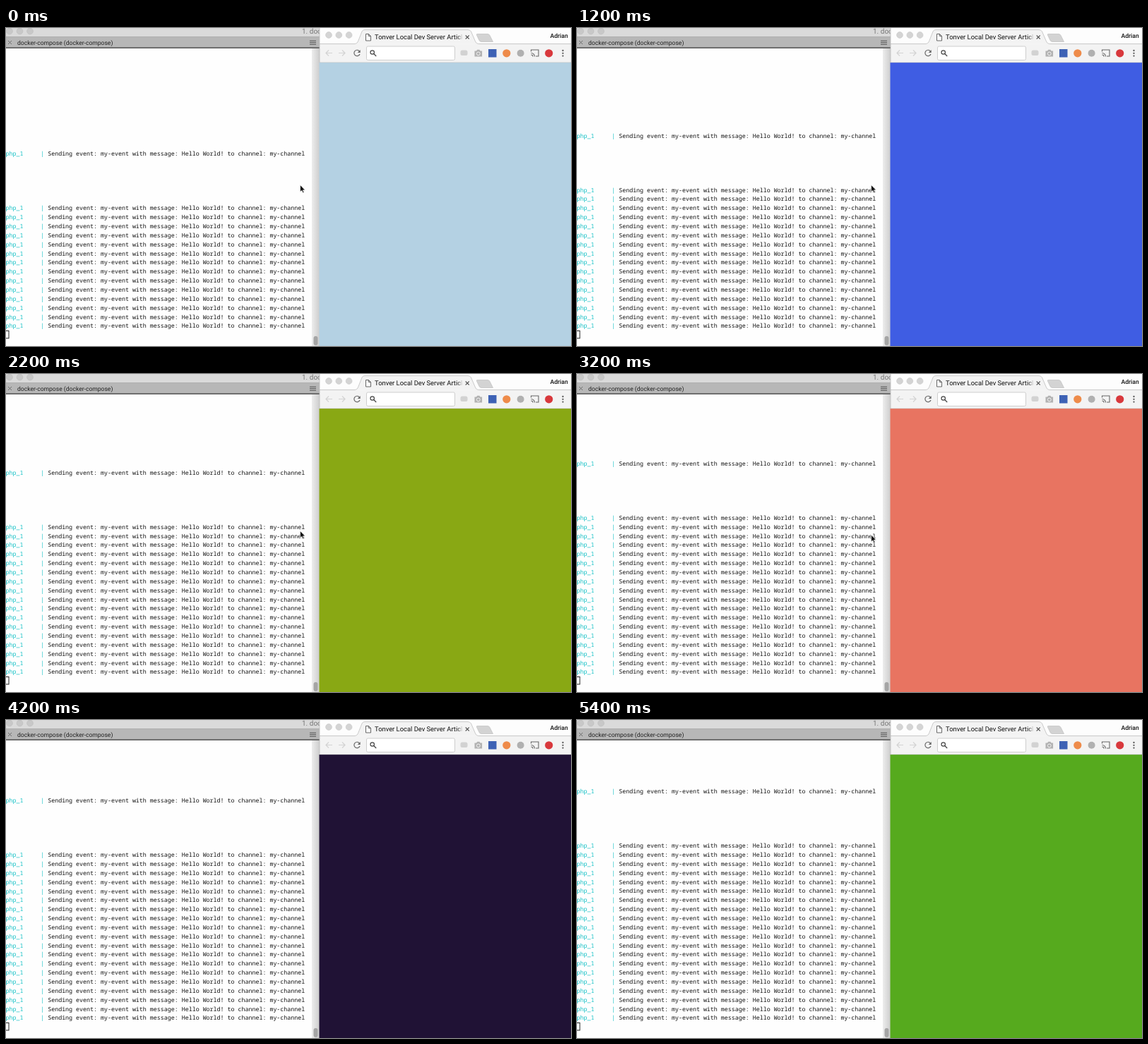
An HTML page that plays this animation: 800 px wide and 451 px high, repeating every 5.6 s.

```html
<!DOCTYPE html>
<html lang="en">
<head>
<meta charset="utf-8">
<title>Event log and live page</title>
<style>
  html, body { margin: 0; width: 100%; height: 100%; overflow: hidden; background: #fff; }
  svg { display: block; width: 800px; height: 451px; }
  text { white-space: pre; text-rendering: geometricPrecision; font-family: Roboto, "Liberation Sans", sans-serif; }
  #log text { font: 8.325px "Noto Sans Mono", "DejaVu Sans Mono", monospace; fill: #111; }
  #log .tag { fill: #12c0c5; }
</style>
</head>
<body>
<svg viewBox="0 0 800 451">
  <defs>
    <clipPath id="logArea"><rect y="29" width="433" height="400"/></clipPath>
    <clipPath id="terminal"><rect width="444" height="451"/></clipPath>
    <clipPath id="tabTitle"><rect x="520" width="127" height="22"/></clipPath>
    <linearGradient id="shade"><stop stop-color="#ededed"/><stop offset="1" stop-color="#cdcdcd"/></linearGradient>
    <linearGradient id="fade"><stop stop-color="#f3f3f3" stop-opacity="0"/><stop offset="1" stop-color="#f3f3f3"/></linearGradient>
  </defs>

  <!-- Terminal -->
  <g clip-path="url(#terminal)">
    <rect width="444" height="451" fill="#fefefe"/>
    <rect width="444" height="13" fill="#dadada"/>
    <g fill="#c8c8c8" stroke="#bababa" stroke-width=".6">
      <circle cx="5" cy="4.5" r="4.4"/><circle cx="19.5" cy="4.5" r="4.4"/><circle cx="34" cy="4.5" r="4.4"/>
    </g>
    <text x="419" y="8" font-size="10" fill="#777">1. docker</text>
    <rect y="12.5" width="444" height="15.5" fill="#b7b7b7"/>
    <path d="M0 12.5H444" stroke="#a5a5a5" stroke-width=".7"/>
    <path d="M0 28.2H444" stroke="#333" stroke-width="1.2"/>
    <path d="M3 18l5 5m0-5l-5 5" stroke="#666" stroke-width=".9"/>
    <text x="16" y="23.8" font-size="8.55" fill="#222">docker-compose (docker-compose)</text>
    <path d="M430 18.2h9m-9 2.5h9m-9 2.5h9" stroke="#555"/>
    <rect x="433" y="29" width="11" height="422" fill="url(#shade)"/>
    <rect x="435.5" y="437" width="6" height="13" rx="3" fill="#a5a5a5"/>
    <g clip-path="url(#logArea)"><g id="log"></g></g>
    <rect x="-2" y="429.5" width="6" height="10.5" fill="none" stroke="#222"/>
  </g>

  <!-- Browser -->
  <rect x="444" width="356" height="22.5" fill="#fdfdfd"/>
  <rect x="444" y="22.5" width="356" height="27" fill="#f3f3f3"/>
  <path d="M444 22.5H494Q497 22.5 498.5 19L504 5Q505 2.5 508 2.5H654Q657 2.5 658.5 5L664.5 19Q666 22.5 669 22.5H800" fill="#f3f3f3" stroke="#c4c4c4" stroke-width=".9"/>
  <path d="M667 8.5H682Q684 8.5 685 10.5L689.5 19.5H673Q671 19.5 670 17.5L666.5 10Q666 8.5 667 8.5Z" fill="#d3d3d3" stroke="#c0c0c0" stroke-width=".7"/>
  <g fill="#d4d4d4" stroke="#c6c6c6" stroke-width=".6">
    <circle cx="457" cy="10" r="4.4"/><circle cx="471.3" cy="10" r="4.4"/><circle cx="485.6" cy="10" r="4.4"/>
  </g>
  <path d="M509.5 8.5h4l3 3v6.5h-7zM513.5 8.5v3h3" fill="#fff" stroke="#666"/>
  <text x="522" y="16.2" font-size="9.4" fill="#111" clip-path="url(#tabTitle)">Tonver Local Dev Server Article</text>
  <rect x="639" y="6" width="8" height="14" fill="url(#fade)"/>
  <path d="M650.7 10.5l5 5m0-5l-5 5" stroke="#555" stroke-width="1.1"/>
  <text x="770.5" y="13.8" font-size="8.6" font-weight="500" fill="#111">Adrian</text>

  <g fill="none" stroke="#d3d3d3" stroke-width="1.2">
    <path d="M462 35.5h-9m4-4l-4 4 4 4M471 35.5h9m-4-4l4 4-4 4"/>
    <path d="M500.5 33A4.2 4.2 0 1 0 501 37" stroke="#666"/>
  </g>
  <path d="M501.7 31v4h-4z" fill="#666"/>
  <rect x="510.5" y="26" width="125" height="19.5" rx="2" fill="#fff" stroke="#cecece"/>
  <g fill="none" stroke="#444" stroke-width="1.2"><circle cx="518.7" cy="34.5" r="2.7"/><path d="M520.7 36.5l3.5 3.5"/></g>

  <rect x="643.5" y="31.5" width="10" height="7.5" rx="2.5" fill="#d2d2d2"/>
  <path d="M663.5 32.5h2.5l1.3-1.7h3l1.3 1.7h2.5v8h-10.6z" fill="#b2b2b2"/>
  <circle cx="668.8" cy="36.4" r="2.4" fill="#b2b2b2" stroke="#f3f3f3"/>
  <rect x="683" y="30" width="11.5" height="11.5" fill="#3e62b5"/>
  <circle cx="708.8" cy="35.8" r="5.6" fill="#ee8b4a"/>
  <circle cx="728.6" cy="35.8" r="5" fill="#b0b0b0"/>
  <path d="M743.5 33.5v-2.5h10.5v9h-4M743.5 35.5a5 5 0 0 1 5 5M743.5 38a2.5 2.5 0 0 1 2.5 2.5" fill="none" stroke="#666" stroke-width="1.1"/>
  <circle cx="768.7" cy="35.8" r="5.6" fill="#d8383c"/>
  <g fill="#555"><circle cx="788.5" cy="32" r="1.15"/><circle cx="788.5" cy="35.8" r="1.15"/><circle cx="788.5" cy="39.6" r="1.15"/></g>
  <rect id="page" x="443.5" y="49" width="356.5" height="402"/>
  <path d="M444 0V49" stroke="#bdbdbd" stroke-width=".8"/>
  <path d="M444 48.8H800" stroke="#c2c2c2" stroke-width=".6"/>

  <path id="pointer" d="M0 0V10L2.3 8 4 11.5 5.6 10.8 4 7.4H7Z" fill="#111" stroke="#fff" stroke-width=".7"/>
</svg>
<script>
  const LOOP = 5600, PITCH = 12.85, BASE = 425.4;
  const COLORS = ['#b4d1e3', '#a1286a', '#3f5de3', '#89a814', '#e87461', '#201235', '#56aa1e'];
  const byId = id => document.getElementById(id);
  const log = byId('log'), page = byId('page'), pointer = byId('pointer');

  const addText = (x, y, text, cls) => {
    const el = document.createElementNS('http://www.w3.org/2000/svg', 'text');
    el.setAttribute('x', x);
    el.setAttribute('y', y);
    el.setAttribute('class', cls);
    el.textContent = text;
    log.append(el);
  };
  const addLine = row => {
    const y = BASE + row * PITCH;
    addText(-.5, y, 'php_1     |', 'tag');
    addText(59.2, y, 'Sending event: my-event with message: Hello World! to channel: my-channel', 'msg');
  };
  addLine(-19);
  for (let row = -13; row < COLORS.length; row++) addLine(row);

  // Each second one event scrolls the log and recolours the page.
  function draw(now) {
    const t = now % LOOP;
    const sent = Math.floor((t + 800) / 1000);
    log.setAttribute('transform', `translate(0 ${-sent * PITCH})`);
    page.setAttribute('fill', COLORS[sent]);
    pointer.setAttribute('transform', `translate(416.5 ${t < 3200 ? 222.5 : 228})`);
    pointer.setAttribute('visibility', t < 4200 ? 'visible' : 'hidden');
  }
  const start = performance.now();
  function tick() {
    draw(performance.now() - start);
    requestAnimationFrame(tick);
  }
  tick();
</script>
</body>
</html>
```
